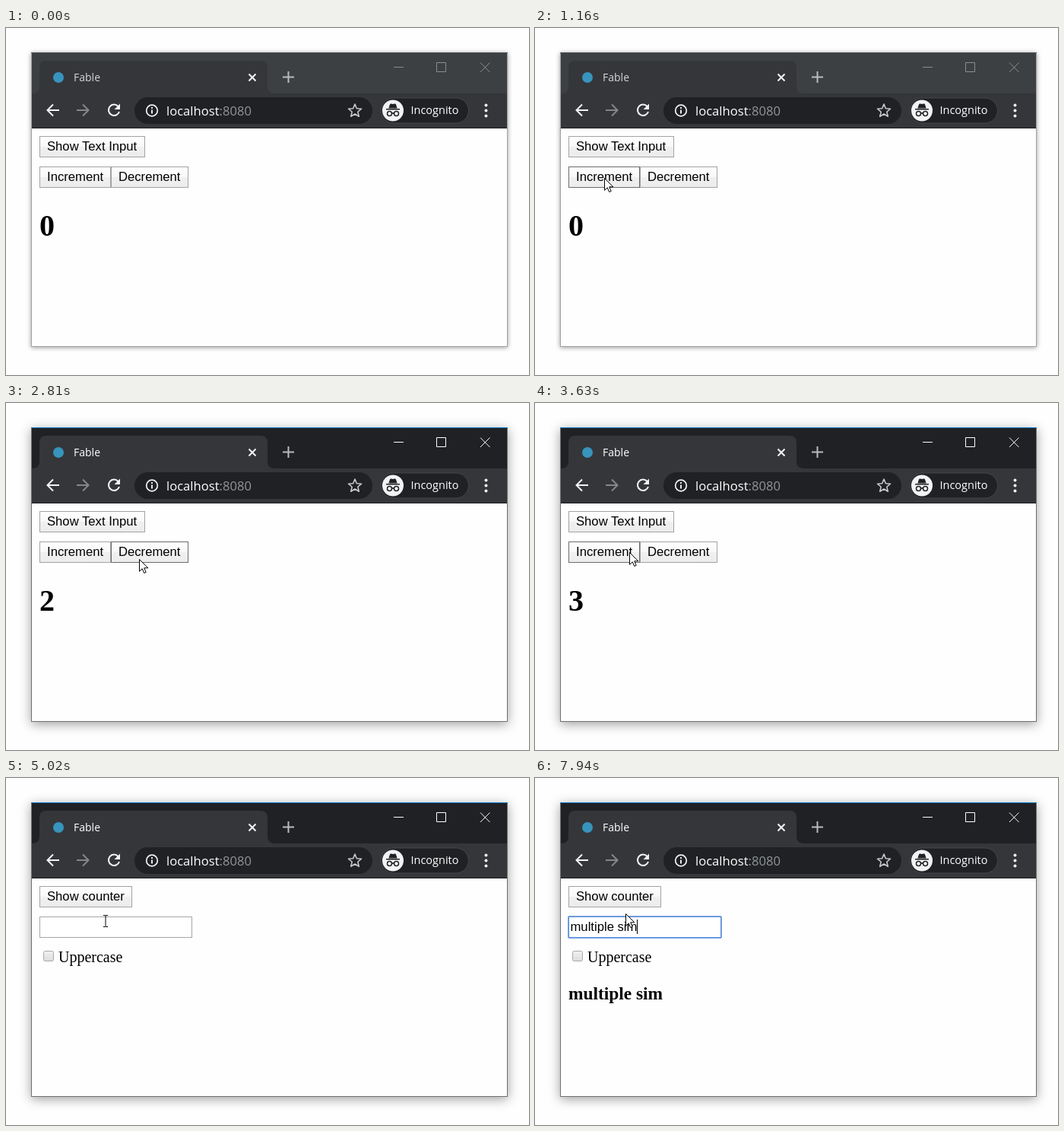
Write an HTML page that moves like this. It is 688 px wide and 456 px high and loops after 8000 ms.

```html
<!DOCTYPE html>
<html lang="en">
<head>
<meta charset="utf-8">
<title>Counter and text input</title>
<style>
  html, body { margin: 0; width: 100%; height: 100%; overflow: hidden; background: #fefefe; }
  #shadow {
    position: absolute; left: 33px; top: 32px; width: 627px; height: 387px;
    box-shadow: 0 1px 6px rgba(0, 0, 0, .4);
  }
  #shadow.active { box-shadow: 0 3px 14px rgba(0, 0, 0, .38); }
  svg { position: absolute; left: 0; top: 0; display: block; }
  text { white-space: pre; }

  .chrome { font-family: "Open Sans", "Noto Sans", sans-serif; fill: #fff; }
  .form { font: 16.667px "Liberation Sans", Arial, sans-serif; fill: #000; }
  .page { font-family: "Liberation Serif", "Times New Roman", serif; fill: #000; }
  .bold { font-weight: bold; }
  .line { fill: none; stroke: #f1f3f4; stroke-width: 2; }

  .strip { fill: #3c4043; }
  .edge { fill: none; stroke: #a2a2a2; }
  .topline { fill: #53575a; }
  .caption { fill: none; stroke: #8b8e90; }
  .title { fill: #d5d6d8; }
  .active .strip { fill: #202124; }
  .active .edge { stroke: #707070; }
  .active .topline { fill: #0e78c8; }
  .active .caption { stroke: #fff; }
  .active .title { fill: #fff; }

  .button rect { fill: url(#face); stroke: #a3a3a3; }
  .button.hover rect { stroke: #6c6c6c; }
  .button.down rect { fill: url(#pressed); stroke: #6c6c6c; }
</style>
</head>
<body>
<div id="shadow"></div>
<svg id="stage" width="688" height="456" viewBox="0 0 688 456">
  <defs>
    <linearGradient id="face" x2="0" y2="1">
      <stop stop-color="#fefefe"/><stop offset=".5" stop-color="#f8f8f8"/>
      <stop offset=".5" stop-color="#f0f0f0"/><stop offset="1" stop-color="#ececec"/>
    </linearGradient>
    <linearGradient id="pressed" x2="0" y2="1">
      <stop stop-color="#dedede"/><stop offset="1" stop-color="#f1f1f1"/>
    </linearGradient>
    <linearGradient id="check" x2="0" y2="1">
      <stop stop-color="#f1f1f1"/><stop offset="1" stop-color="#dcdcdc"/>
    </linearGradient>
  </defs>

  <g id="window">
    <rect x="33" y="32" width="627" height="387" fill="#fefefe"/>
    <rect class="strip" x="33" y="32" width="627" height="54"/>
    <path fill="#35363a" d="M33 132V86h1q10 0 10-9V52q0-9 9-9h282q9 0 9 9v25q0 9 10 9h306v46z"/>
    <rect x="33" y="131" width="627" height="1" fill="#1b1c1e"/>
    <rect class="edge" x="33.5" y="32.5" width="626" height="386"/>
    <rect class="topline" x="33" y="32" width="627" height="1"/>

    <circle cx="69" cy="65" r="7" fill="#3794bd"/>
    <text class="chrome title" x="89" y="70" font-size="14">Fable</text>
    <path class="line" d="M319.5 60.5l9 9m0-9l-9 9" stroke-width="1.8"/>
    <path class="line" d="M364 64.5h15m-7.5-7.5v15" style="stroke:#b9bbbd"/>
    <path class="caption" d="M510 51.5h13M566.500 45.500h12v12h-12zM624 45.500l12.500 12.500m0-12.500l-12.500 12.500"/>

    <path class="line" d="M70 108H54.500m7.500-7.500L54.500 108l7.500 7.500"/>
    <path class="line" d="M93 108h15.500m-7.500-7.500l7.500 7.500l-7.500 7.500" style="stroke:#85878a"/>
    <path class="line" d="M147.500 103A7.200 7.200 0 1 0 149 110"/>
    <path fill="#f1f3f4" d="M150 99.500v7.500h-7.500z"/>

    <rect x="169" y="91" width="313" height="35" rx="17.500" fill="#202124"/>
    <circle class="line" cx="192" cy="108.500" r="7.300" style="stroke-width:1.700"/>
    <path class="line" d="M192 107.500v5m0-8.500v2" style="stroke-width:1.900"/>
    <text class="chrome" x="211" y="115" font-size="16.600">localhost<tspan fill="#929699">:8080</tspan></text>
    <path id="star" fill="none" stroke="#c6c8ca" stroke-width="1.600" stroke-linejoin="round"/>

    <rect x="493.500" y="92" width="115" height="33" rx="16.500" fill="#202124" stroke="#45464a"/>
    <circle cx="509" cy="108.500" r="14" fill="#f1f3f4"/>
    <path fill="#202124" d="M505 100.500q.5-1.500 2-1l2 .5l2-.5q1.500-.5 2 1l1.700 5h-11.400zM500 106h18v1.500h-18z"/>
    <path fill="none" stroke="#202124" stroke-width="1.500" d="M501.500 112.500a3 3 0 1 0 6 0a3 3 0 1 0-6 0m6 0q1.500-1.300 3 0a3 3 0 1 0 6 0a3 3 0 1 0-6 0"/>
    <text class="chrome" x="532.500" y="113" font-size="14.500">Incognito</text>
    <g fill="#f1f3f4">
      <circle cx="631.500" cy="101.500" r="2"/><circle cx="631.500" cy="108.500" r="2"/><circle cx="631.500" cy="115.500" r="2"/>
    </g>
  </g>

  <g id="counter">
    <text id="count" class="page bold" x="44" y="273" font-size="40">0</text>
  </g>

  <g id="editor">
    <rect x="44.500" y="182.500" width="200" height="27" fill="#fff" stroke="#a6a6a6"/>
    <g id="ring" fill="none">
      <rect x="43.500" y="181.500" width="202" height="29" rx="1.500" stroke="#7aa7e4"/>
      <rect x="44.500" y="182.500" width="200" height="27" stroke="#5b8fd8"/>
    </g>
    <text id="typed" class="form" x="46.500" y="201"></text>
    <rect id="caret" y="186" width="1" height="19"/>
    <rect x="49.500" y="227.500" width="13" height="13" rx="2" fill="url(#check)" stroke="#a9a9a9"/>
    <text class="page" x="69" y="242" font-size="20">Uppercase</text>
    <text id="echo" class="page bold" x="44" y="291" font-size="23.400"></text>
  </g>

  <g id="pointer">
    <path id="arrow" fill="#fff" stroke="#000" stroke-linejoin="miter"
          d="M.5.5v15.800l3.700-3.500l2.500 5.700l2.500-1.100l-2.500-5.600h5.200z"/>
    <path id="beam" fill="none" stroke="#000" d="M-3 -7.500h2.500l.5.500l.5-.5h2.500M0 -7V7M-3 7.500h2.500l.5-.5l.5.5h2.500"/>
  </g>
</svg>

<script>
const LOOP = 8000, ACTIVATE = 1300, SWITCH = 4490, FOCUS = 5170, BLINK = 530;
const $ = id => document.getElementById(id);
const show = (el, on) => { el.style.display = on ? '' : 'none'; };

// Pointer moves: start, end, then from, control and to points of a curve.
const moves = [
  [130, 1010, 520, 433, 165, 375, 91, 197],
  [2090, 2360, 91, 197, 130, 200, 175, 205],
  [2880, 3290, 175, 205, 150, 198, 124, 196],
  [3700, 4100, 124, 196, 121, 170, 126, 152],
  [4770, 5020, 126, 152, 128, 172, 131, 188],
  [5400, 5640, 131, 188, 128, 186, 121, 172],
  [5640, 5760, 121, 172, 120, 174, 119, 178]
];

// Mouse presses: down, up, button, resulting count.
const presses = [
  [ACTIVATE, 1400, 'inc', 1], [1530, 1600, 'inc', 2], [1760, 1830, 'inc', 3],
  [2560, 2630, 'dec', 2], [3390, 3460, 'inc', 3], [4330, SWITCH, 'text', 3]
];

const phrase = 'multiple sim';
const keys = [6150, 6350, 6640, 6870, 6940, 7100, 7250, 7360, 7450, 7630, 7760, 7940];

function makeButton(parent, id, x, y, w, label) {
  const g = document.createElementNS('http://www.w3.org/2000/svg', 'g');
  g.innerHTML = `<rect x="${x + .5}" y="${y + .5}" width="${w - 1}" height="27"/>
    <text class="form" x="${x + 10}" y="${y + 19}">${label}</text>`;
  parent.append(g);
  return { id, g, hit: (px, py) => px >= x && px < x + w && py >= y && py < y + 28 };
}

const counterButtons = [
  makeButton($('counter'), 'text', 44, 142, 139, 'Show Text Input'),
  makeButton($('counter'), 'inc', 44, 182, 94, 'Increment'),
  makeButton($('counter'), 'dec', 138, 182, 102, 'Decrement')
];
const editorButtons = [makeButton($('editor'), 'back', 44, 142, 122, 'Show counter')];

$('star').setAttribute('d', 'M' + Array.from({ length: 10 }, (_, i) => {
  const r = i % 2 ? 4 : 9, a = i * Math.PI / 5;
  return (459 + r * Math.sin(a)).toFixed(2) + ' ' + (109 - r * Math.cos(a)).toFixed(2);
}).join('L') + 'z');

function pointerAt(t) {
  const m = moves.filter(m => t >= m[0]).pop();
  if (!m) return null;
  const [t0, t1, x0, y0, cx, cy, x1, y1] = m;
  const p = Math.min(1, (t - t0) / (t1 - t0));
  const u = .6 * p + .4 * p * p * (3 - 2 * p), v = 1 - u;
  const mix = (a, b, c) => Math.round(v * v * a + 2 * u * v * b + u * u * c);
  return [mix(x0, cx, x1), mix(y0, cy, y1)];
}

function drawButtons(buttons, pos, held) {
  for (const b of buttons) {
    const over = pos && b.hit(...pos);
    b.g.setAttribute('class', 'button' + (over ? ' hover' : '') + (held === b.id ? ' down' : ''));
  }
}

function render(t) {
  const active = t >= ACTIVATE, editing = t >= SWITCH, focused = t >= FOCUS;
  $('window').classList.toggle('active', active);
  $('shadow').classList.toggle('active', active);
  show($('counter'), !editing);
  show($('editor'), editing);

  const pos = pointerAt(t);
  show($('pointer'), pos);
  if (pos) {
    const inField = editing && pos[0] >= 44 && pos[0] < 245 && pos[1] >= 182 && pos[1] < 210;
    $('pointer').setAttribute('transform', `translate(${pos})`);
    show($('arrow'), !inField);
    show($('beam'), inField);
  }

  const held = presses.find(p => t >= p[0] && t < p[1]);
  const done = presses.filter(p => t >= p[1]).pop();
  $('count').textContent = done ? done[3] : 0;
  drawButtons(editing ? editorButtons : counterButtons, pos, held && held[2]);

  const n = keys.filter(k => t >= k).length;
  const text = phrase.slice(0, n);
  if ($('typed').textContent !== text) {
    $('typed').textContent = text;
    $('echo').textContent = text;
  }
  if (editing) {
    const since = t - (n ? keys[n - 1] : FOCUS);
    show($('ring'), focused);
    show($('caret'), focused && since % (2 * BLINK) < BLINK);
    $('caret').setAttribute('x', n ? Math.round(46.5 + $('typed').getComputedTextLength()) : 47);
  }
}

function frame() {
  render(performance.now() % LOOP);
  requestAnimationFrame(frame);
}
frame();
</script>
</body>
</html>
```
